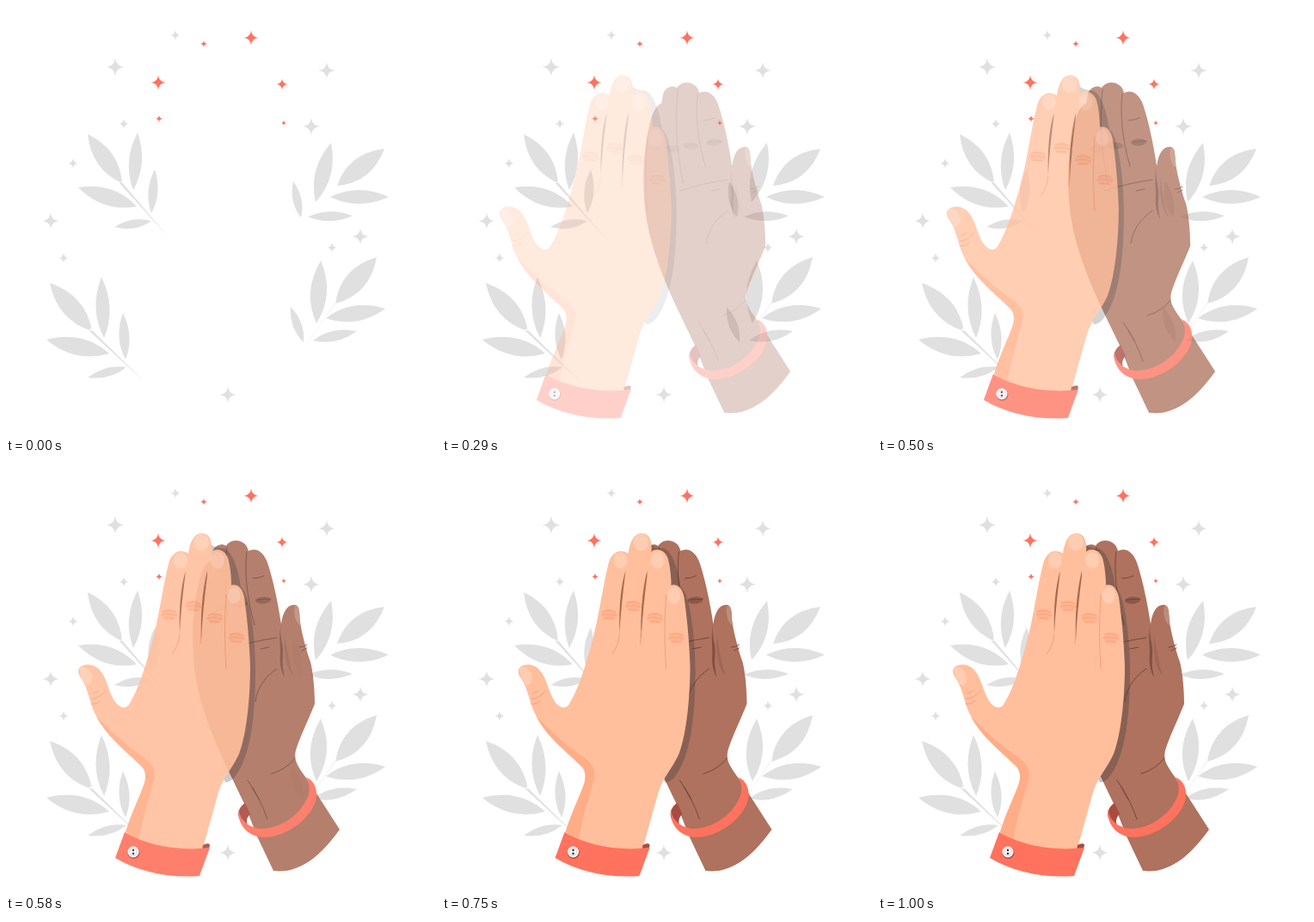
Write an HTML page that moves like this. It is 500 px wide and 500 px high and loops after 1.04 s.

```html
<!DOCTYPE html>
<html lang="en">
<head>
<meta charset="utf-8">
<title>High five</title>
<style>
  html, body { margin: 0; width: 100%; height: 100%; overflow: hidden; background: #fff; }
  svg { display: block; width: 100vw; height: 100vh; }
  .line { fill: none; stroke-width: .9; stroke-linecap: round; }
</style>
</head>
<body>
<svg viewBox="0 0 500 500">
  <g id="plants" fill="#e0e0e0"></g>
  <g id="stars"></g>

  <g id="right" opacity="0">
    <path fill="#ae725e" d="M308 473C330 476 356 466 385 425L358 383 346 365C337 352 331 345 334 333C338 319 348 299 356 279
      C356 262 354 241 351 230C347 219 341 198 339 183C338 174 339 166 334 164C325 162 319 171 317 186
      C314 165 307 130 300 112C295 101 287 97 279 101C277 92 270 89 264 89C259 89 255 92 253 95
      C247 91 239 95 237 102L235 113C225 117 221 135 217 160C213 187 213 222 218 250C224 285 238 318 250 345L275 397 289 433Z"/>
    <g fill="#7f5043">
      <ellipse cx="296" cy="158.5" rx="9" ry="4" transform="rotate(-5 296 158)" opacity=".75"/>
      <ellipse cx="269" cy="162.500" rx="9" ry="4" opacity=".6"/>
      <ellipse cx="248" cy="166" rx="9" ry="4" opacity=".5"/>
      <path d="M317 186C314 200 320 208 319 222C318 232 319 240 321 248C316 240 315 229 316 219C316 208 314 198 317 186Z"/>
      <path opacity=".3" d="M321 200C324 216 327 235 331 246C323 238 320 222 321 200Z"/>
    </g>
    <path fill="#bd8d7b" d="M333 165C331 173 333 183 339 188C338 180 339 167 335 165Z"/>
    <g class="line" stroke="#6f4438">
      <path d="M277 102C274 125 277 155 286 187M254 97C251 125 251 165 260 205"/>
      <path d="M256 215Q283 206 312 202M293 215L303 213M284 133Q291 133 297 130M288 158L305 157"/>
      <path d="M287 276C289 259 300 246 312 238M306 360Q323 355 333 342M278 368Q292 387 301 413M283 376L291 390"/>
      <path d="M338 213Q344 213 347 210M341 217L347 214"/>
    </g>
    <path fill="#a84b40" d="M275 394C268 399 265 406 269 414C271 420 275 422 278 421C276 415 277 411 281 407Z"/>
    <path fill="#ff725e" d="M268 401C265 417 277 434 297 434C324 434 355 410 358 387C359 375 354 368 346 364
      C351 373 351 382 346 391C337 410 314 424 295 424C283 424 268 416 268 401Z"/>
  </g>

  <g id="left" opacity="0">
    <path fill="#263238" opacity=".27" d="M239 91C245 97 249 98 256 98C268 102 274 128 276 143C287 150 293 204 293 240
      C293 290 288 342 268 365Q262 371 258 370L240 340Z"/>
    <path fill="#ffbf9d" d="M142 428C149 405 159 386 164 371Q167 360 162 353C149 339 120 318 108 293C101 282 99 262 91 250
      C86 244 85 237 93 234C104 231 112 237 117 247C123 259 127 281 139 283Q144 284 147 278
      C160 257 171 216 178 186C183 162 187 136 192 116C195 104 204 97 215 104C217 90 222 80 231 80.500
      C240 81 243 89 242 102C249 96 260 101 262 113C264 122 265 133 265 141C273 139 278 145 280 155
      C283 175 286 205 287 235C287 270 283 314 274 337C267 353 255 365 250 382L231 450Q185 456 142 428Z"/>
    <path fill="#ffad86" d="M108 293C120 318 149 339 162 353Q167 360 164 371C159 386 149 405 142 428L157 438
      C162 410 170 386 175 367C179 352 169 345 156 336C139 324 122 308 108 293Z"/>
    <g fill="#ffcdb2">
      <ellipse cx="206" cy="112" rx="8" ry="9.500"/>
      <ellipse cx="230" cy="91" rx="9" ry="10"/>
      <ellipse cx="249" cy="112" rx="8" ry="9.500"/>
      <ellipse cx="268" cy="153" rx="7.500" ry="9.500"/>
      <path d="M89 237C94 234 101 239 103 246C104 253 100 258 96 257C93 250 87 245 89 237Z"/>
    </g>
    <g fill="#a8694f">
      <path d="M212 124C206 142 204 170 205 197C206 175 209 148 212 124Z"/>
      <path d="M237 124C231 148 229 178 230 206C231 180 234 154 237 130Z"/>
    </g>
    <g class="line" stroke="#f59a72">
      <path d="M205 198Q204 211 196 221M230 193L229 209M259 152Q256 195 259 238"/>
      <path d="M103 273Q112 273 119 263M102 279Q109 280 113 275M104 267L110 264"/>
    </g>
    <g id="knuckles"></g>
    <path fill="#a84b40" d="M231 450L232 443Q240 439 240 444L237 452Z"/>
    <path fill="#ff725e" d="M141 428C163 442 202 451 240 446L228 479C193 482 157 474 130 458Z"/>
    <circle cx="151.500" cy="452" r="7" fill="#ad4f43"/>
    <circle cx="151" cy="451" r="6.500" fill="#fff"/>
    <circle cx="151" cy="451" r="4.500" fill="#f3f3f3" stroke="#c4c4c4" stroke-width=".7"/>
    <g fill="#263238"><circle cx="151" cy="449" r="1.200"/><circle cx="151" cy="453" r="1.200"/></g>
  </g>
</svg>
<script>
const $ = id => document.getElementById(id);

// Each sprig: stem base and top, then leaves as tip x, y, base x, y, width.
const sprigs = [
  { stem: [189, 269, 133, 205], leaves: [[95, 149, 135, 206, 20], [153, 147, 148, 214, 15],
    [84, 211, 152, 233, 19], [173, 190, 169, 241, 11], [126, 257, 169, 250, 10]] },
  { stem: [162, 438, 97, 376], leaves: [[51, 322, 100, 378, 22], [111, 315, 114, 386, 16],
    [47, 388, 120, 404, 20], [136, 357, 139, 411, 12], [95, 432, 140, 420, 10]] },
  { stem: [326, 266, 387, 207], leaves: [[440, 166, 385, 209, 22], [378, 159, 360, 228, 18],
    [445, 222, 377, 222, 16], [334, 204, 343, 246, 10], [403, 244, 351, 245, 11]] },
  { stem: [333, 416, 384, 344], leaves: [[431, 292, 383, 346, 23], [366, 296, 361, 369, 19],
    [441, 352, 372, 363, 18], [331, 350, 346, 391, 10], [408, 378, 357, 389, 12]] }
];

function leaf([x, y, bx, by, w]) {
  const dx = bx - x, dy = by - y, len = Math.hypot(dx, dy);
  const mx = x + dx * .52, my = y + dy * .52;
  const nx = -dy / len * w, ny = dx / len * w;
  return `M${x} ${y}Q${mx + nx} ${my + ny} ${bx} ${by}Q${mx - nx} ${my - ny} ${x} ${y}Z`;
}

function stem([x, y, tx, ty]) {
  return `M${x} ${y}L${tx - 1} ${ty + 1}L${tx + 1} ${ty - 1}Z`;
}

$('plants').innerHTML = sprigs.map(s =>
  `<path d="${stem(s.stem)}${s.leaves.map(leaf).join('')}"/>`).join('');

const grayStars = [[197, 34, 6], [127, 71, 10.5], [373, 75, 9.5], [137, 137, 6], [355, 140, 10], [78, 183, 6],
  [52, 250, 9.5], [67, 293, 6], [412, 268, 9.5], [379, 281, 6], [258, 452, 9.5]];
const coralStars = [[230, 44, 4], [285, 37, 8.5], [177, 89, 8.5], [321, 91, 6.5], [178, 131, 4], [323, 136, 3.3]];

function star([x, y, r]) {
  const k = r * .09;
  return `M${x} ${y - r}Q${x + k} ${y - k} ${x + r} ${y}Q${x + k} ${y + k} ${x} ${y + r}` +
    `Q${x - k} ${y + k} ${x - r} ${y}Q${x - k} ${y - k} ${x} ${y - r}Z`;
}

$('stars').innerHTML = [['#e0e0e0', grayStars], ['#ff725e', coralStars]].map(([fill, list]) =>
  `<path fill="${fill}" d="${list.map(star).join('')}"/>`).join('');

$('knuckles').innerHTML = [[193, 175], [221, 165], [246, 179], [271, 202]].map(([x, y]) =>
  `<g transform="translate(${x} ${y}) rotate(4)">
    <ellipse rx="9" ry="6.5" fill="#ffb48f"/>
    <path class="line" stroke="#f8a17b" d="M-8 -3Q0 -6 8 -3M-9 1Q0 -2 9 1M-6 5Q0 3 6 5"/></g>`).join('');

// Cubic easing with a slight overshoot near the end.
function ease(x) {
  if (x <= 0) return 0;
  if (x >= 1) return 1;
  const curve = (s, a, b) => 3 * (1 - s) ** 2 * s * a + 3 * (1 - s) * s * s * b + s ** 3;
  let lo = 0, hi = 1;
  for (let i = 0; i < 24; i++) {
    const mid = (lo + hi) / 2;
    if (curve(mid, .36, .5) < x) lo = mid; else hi = mid;
  }
  return curve(lo, -.01, 1.38);
}

const LOOP = 1040, FPS = 24, SLIDE = 30, FIRST_STEP = 3;
const start = performance.now();

function place(id, x, opacity) {
  $(id).setAttribute('transform', `translate(${x.toFixed(2)} 0)`);
  $(id).setAttribute('opacity', opacity.toFixed(3));
}

function draw() {
  const t = (performance.now() - start) % LOOP;
  const step = Math.floor((t + 4) * FPS / 1000);
  const p = step < FIRST_STEP ? 0 : ease(step / FPS + .01);
  const shift = SLIDE * (1 - p), opacity = Math.min(1, Math.max(0, p));
  place('left', -shift, opacity);
  place('right', shift, opacity);
  requestAnimationFrame(draw);
}
draw();
</script>
</body>
</html>
```
